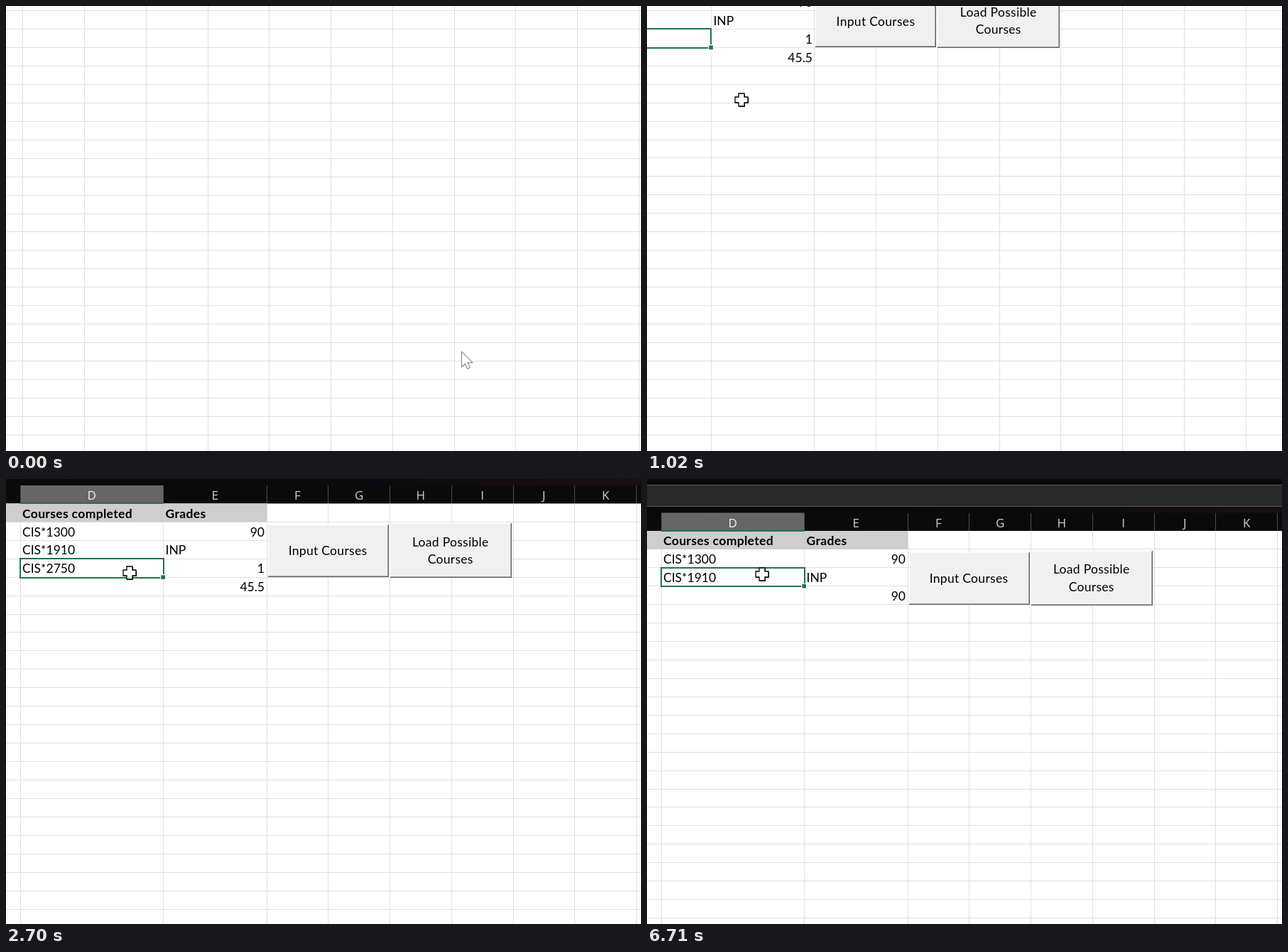
Recreate the animation shown at these times as an HTML page. Size 894 px wide and 626 px high, loop 8 s.

```html
<!DOCTYPE html>
<html lang="en">
<head>
<meta charset="utf-8">
<title>Course sheet</title>
<style>
  html, body { margin: 0; width: 100%; height: 100%; overflow: hidden; background: #fff; }
  svg { display: block; width: 894px; height: 626px; }
  text { font: 17.5px Lato, Calibri, sans-serif; fill: #000; white-space: pre; }
  .bold { font-weight: 700; letter-spacing: .35px; }
  .label { letter-spacing: .3px; text-anchor: middle; }
  .num { text-anchor: end; }
  .head { font: 17px "Open Sans", "Noto Sans", sans-serif; fill: #d2d2d2; text-anchor: middle; }
  .crisp { shape-rendering: crispEdges; }
</style>
</head>
<body>
<svg id="stage" viewBox="0 0 894 626" xmlns="http://www.w3.org/2000/svg">
  <defs>
    <linearGradient id="strip">
      <stop offset="0" stop-color="#09090a"/>
      <stop offset=".6" stop-color="#0d0910"/>
      <stop offset="1" stop-color="#19110e"/>
    </linearGradient>
  </defs>
  <rect width="894" height="626" fill="#fff"/>
  <g id="world"></g>
  <g id="arrow">
    <path d="M.5 .5V22L5.3 17.6L8.8 24.5L12.2 22.9L9 16.2L15.8 15.6Z"
      fill="#fff" stroke="#858585" stroke-width="1.1"/>
  </g>
  <g id="cross">
    <path d="M-3 -8H5V-3H10V5H5V10H-3V5H-8V-3H-3Z" fill="#000"/>
    <path d="M-4 -9H4V-4H9V4H4V9H-4V4H-9V-4H-4Z" fill="#fff" stroke="#000" stroke-width="1.3"/>
  </g>
  <g id="spinner" fill="none" stroke-width="4.6">
    <circle r="10" stroke="#2f8ae8"/>
    <path id="arc" d="M-7 7.1A10 10 0 0 1 -7 -7.1" stroke="#35b8f5"/>
  </g>
</svg>
<script>
const NS = "http://www.w3.org/2000/svg";
const $ = id => document.getElementById(id);
const world = $("world");

function add(name, attrs, content, parent = world) {
  const el = document.createElementNS(NS, name);
  for (const k in attrs) el.setAttribute(k, attrs[k]);
  if (content) el.textContent = content;
  parent.appendChild(el);
  return el;
}
const rect = (x, y, width, height, fill, parent) =>
  add("rect", { x, y, width, height, fill }, "", parent);
const path = (d, stroke, width = 1, parent = world) =>
  add("path", { d, stroke, fill: "none", "stroke-width": width, class: "crisp" }, "", parent);
const text = (x, y, str, cls = "") => add("text", { x, y, class: cls }, str);

const ROW = 25.94, COL = 86.75, TOP = 60.3, RIGHT = 1600, BOTTOM = 800;
const cols = [20, 221.5];
for (let i = 0; i < 15; i++) cols.push(367 + COL * i);
const base = row => TOP + (row - 2) * ROW + 20.2;

function buildGrid() {
  let d = "";
  for (const x of cols) d += `M${x} 35V${BOTTOM}`;
  for (let i = 0; i < 29; i++) d += `M0 ${TOP + ROW * i}H${RIGHT}`;
  path(d, "#e0e0e0");
}

function buildHeader() {
  rect(0, -90, RIGHT, 60, "#0a090b");
  rect(0, -30, RIGHT, 30, "#292929");
  rect(0, 0, 894, 9.5, "url(#strip)");
  rect(894, 0, RIGHT - 894, 9.5, "#19110e");
  path(`M0 -30.5H${RIGHT}M0 -.5H${RIGHT}`, "#5c5c5c");
  rect(0, 9, RIGHT, 25.5, "#0a0a0a");
  rect(20, 9, 201.5, 25, "#666");
  path(cols.map(x => `M${x} 9V34`).join(""), "#4c4c4c");
  for (let i = 0; i < cols.length - 1; i++) {
    const letter = text((cols[i] + cols[i + 1]) / 2, 29.2, String.fromCharCode(68 + i), "head");
    if (!i) letter.style.fill = "#f2f2f2";
  }
  rect(0, 34.5, 367, 26, "#cfcdcd");
  path("M20 34H221.5", "#217346", 2);
}

function button(x, y, w, h, lines, firstBase) {
  rect(x, y, w, h, "#f0f0f0");
  path(`M${x + .5} ${y + h}V${y + .5}H${x + w}`, "#fff");
  path(`M${x + w - 1.5} ${y + 1}V${y + h - 1.5}H${x}`, "#a0a0a0");
  path(`M${x + w - .5} ${y}V${y + h - .5}H${x}`, "#666");
  lines.forEach((line, i) => text(x + w / 2 - .5, firstBase + i * 24.3, line, "label"));
}

buildGrid();
buildHeader();
text(23, base(1), "Courses completed", "bold");
text(224.5, base(1), "Grades", "bold");
text(23, base(2), "CIS*1300");
text(364, base(2), "90", "num");
text(23, base(3), "CIS*1910");
text(224.5, base(3), "INP");
const course = text(23, base(4), "CIS*2750");
const grade = text(364, base(4), "1", "num");
const average = text(364, base(5), "45.5", "num");
button(368.5, 64, 170, 74, ["Input Courses"], 107.3);
button(540.5, 62, 171.5, 77, ["Load Possible", "Courses"], 94.8);

const box = add("g");
path("M221.5 134V112H20V138.5H217", "#217346", 2, box);
rect(217.3, 134.3, 7.4, 7.4, "#fff", box);
rect(218.3, 135.3, 5.6, 5.6, "#217346", box);

// Keys are [time, x, y, eased]; "eased" slows the arrival at that key.
const camera = [
  [0, -690.5, -157.5], [360, -512, -109.5], [1020, -131.5, -80],
  [1320, 0, -12.5], [1550, 0, 0, 1], [5740, 0, 0], [5960, 0, 38.5, 1]
];
const pointer = [
  [0, 644, 488], [340, 122, 127, 1], [360, 122, 127], [1020, 133, 132],
  [1320, 137, 130], [1550, 162, 132, 1], [2610, 162, 132], [2700, 174, 132, 1],
  [5740, 174, 132], [5960, 168, 128, 1], [6460, 168, 128], [6590, 162, 134, 1]
];
const select = [[6570, 0, 0], [6710, 0, -ROW, 1]];

function at(keys, t) {
  if (t <= keys[0][0]) return keys[0].slice(1, 3);
  for (let i = 1; i < keys.length; i++) {
    const a = keys[i - 1], b = keys[i];
    if (t > b[0]) continue;
    let p = (t - a[0]) / (b[0] - a[0]);
    if (b[3]) p = 1 - (1 - p) * (1 - p);
    return [a[1] + (b[1] - a[1]) * p, a[2] + (b[2] - a[2]) * p];
  }
  return keys[keys.length - 1].slice(1, 3);
}

const move = (el, [x, y]) => el.setAttribute("transform", `translate(${x} ${y})`);
const show = (el, on) => el.setAttribute("visibility", on ? "visible" : "hidden");

function draw(t) {
  const pos = at(pointer, t), busy = t >= 4880 && t < 4940, removed = t >= 4940;
  move(world, at(camera, t));
  move(box, at(select, t));
  for (const id of ["arrow", "cross", "spinner"]) move($(id), pos);
  show($("arrow"), t < 60);
  show($("cross"), t >= 60 && !busy);
  show($("spinner"), busy);
  $("arc").setAttribute("transform", `rotate(${Math.floor((t - 4880) / 20) * 24})`);
  show(course, !removed);
  show(average, !removed);
  grade.textContent = removed ? "90" : "1";
}

const start = performance.now();
function tick() {
  draw((performance.now() - start) % 8000);
  requestAnimationFrame(tick);
}
tick();
</script>
</body>
</html>
```
